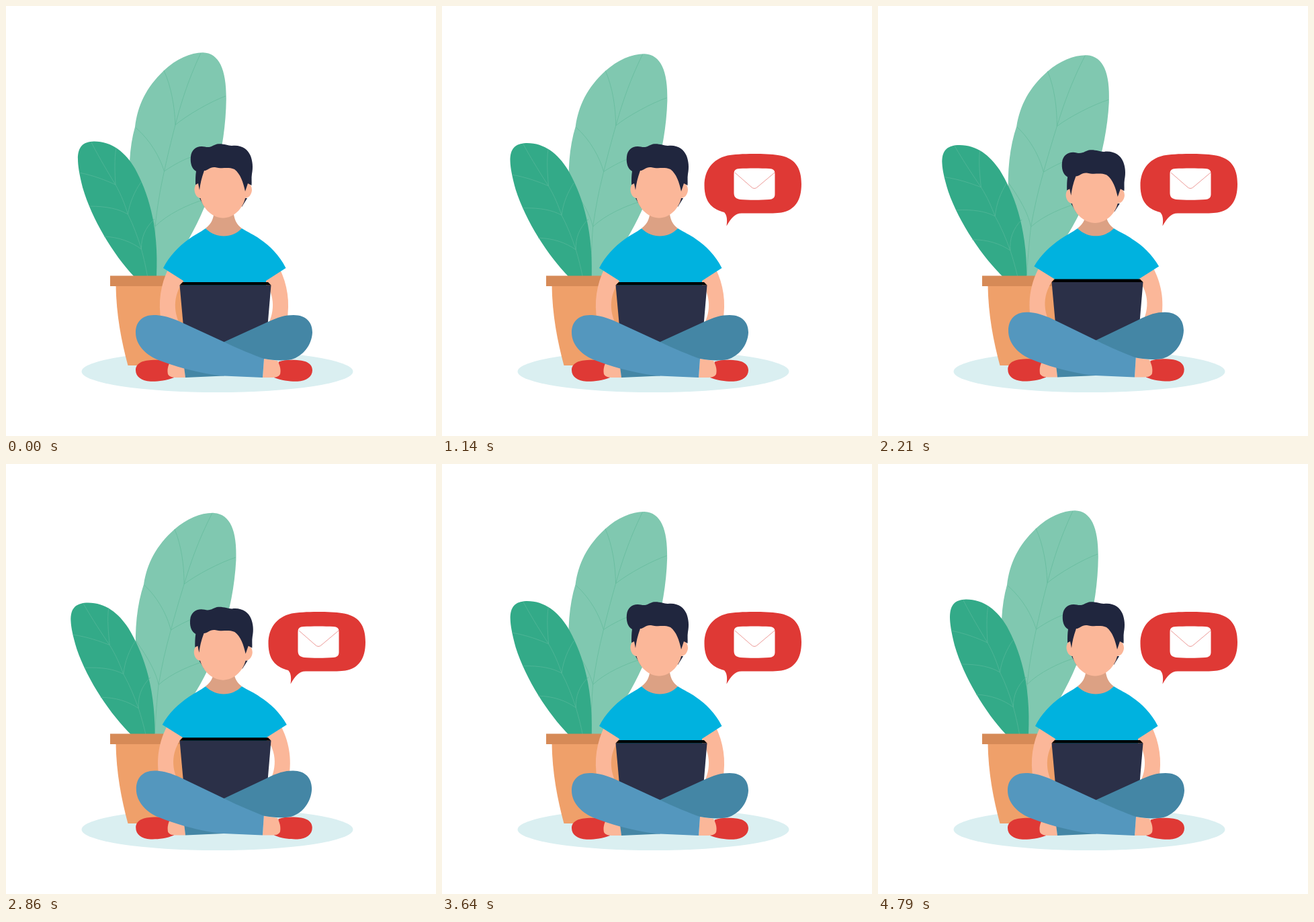
Recreate the animation shown at these times as an HTML page with a canvas. Size 640 by 640 pixels, loop 4.87 s.

```html
<!DOCTYPE html>
<html lang="en">
<head>
<meta charset="utf-8">
<title>Working with a laptop</title>
<style>
  html, body { margin: 0; height: 100%; overflow: hidden; background: #fff; }
  canvas { display: block; }
</style>
</head>
<body>
<canvas id="stage" width="640" height="640"></canvas>
<script>
const ctx = document.getElementById('stage').getContext('2d');
const LOOP = 4870;
const clamp = v => Math.max(0, Math.min(1, v));

const skin = '#fbb799', red = '#df3935', ink = '#20263e';

const lightLeaf = 'M222,402 C184,330 175,240 192,180 C196,148 208,122 235,96 C253,79 275,69.3 293,69.3 C317,70 328,94 327.8,138 C327,215 305,290 272,347 C262,365 248,385 238,402 Z';
const lightVeins = `M290,70 C270,112 259,150 252,177 C246,200 240,225 235.5,246 C229,275 225,300 222,328 C221,350 221,375 221,402
  M235,96 C246,120 251,150 252,177 M327,134 C305,142 270,162 252,177
  M193,181 C215,200 229,225 235.5,246 C250,236 265,228 278,224
  M185,265 C205,290 217,310 222,328 C240,310 270,296 292,289`;

const darkLeaf = 'M190,402 C160,370 128,318 114,270 C109,250 107,237 107,228 C107,209 115,202 131,201.5 C158,201.5 178,218 192,242 C210,275 228,325 224,402 L224,412 L200,412 Z';
const darkVeins = `M127,203 C140,228 152,248 163,266 C172,282 177,296 181.5,310 C190,327 196,344 201.5,362 C205,375 208,388 210.5,402
  M164,211 C161,228 162,248 163,266 M109,248 C130,252 150,260 163,266
  M201,262 C192,275 184,292 181.5,310 M124,298 C150,298 168,302 181.5,310
  M221,317 C207,330 201,345 201.5,362 M146,343 C168,344 187,351 201.5,362`;

const neck = 'M310,300 C310,320 303,326 297,331 L310,346 L340,346 L351,331 C345,326 339,321 338,300 Z';
const shirt = 'M297,331 C305,339 315,342.5 324,342.5 C334,342.5 343,339 351,331 C360,337 369,340 378,347 C393,357 407,371 416.5,390 L387,409 L387,430 L264,430 L264,409 L234,390 C243,372 257,358 272,347 C280,341 289,337 297,331 Z';
const arm = 'M242,390 C230,415 226,440 231,470 L262,480 C249,458 247,432 265,408 Z';

const nape = 'M288,286 L296,300 L296,286 Z M359,286 L351,299 L351,286 Z';
const ears = 'M290,264 C284,262 280.5,267 280.5,274 C281,281 285,286 290,286 Z M356,264 C362,262 366,267 366,274 C365.5,281 361,286 356,286 Z';
const face = 'M290,232 L356,232 L357.5,275 C357,300 339,315.5 323,315.5 C307,315.5 288.5,300 288,275 Z';
const hair = 'M283,246 C276,242 274,233 275,224 C276,213 285,207 296,209.5 C305,212 309,206 316,205.3 C325,205 330,208 336,208 C350,206 360,213 364,223 C367,231 368,240 366,250 C365,256 366,262 365.5,267 L360,264 L356,276 C353,262 349,250 340,243 C330,239 322,243 311,240 C304,239 300,245 295,245 C291,256 289,265 288,274 L286,264 L282,266 C282,258 282,252 283,246 Z';

const laptop = 'M258.5,415.5 L394.5,415.5 L386.5,510 L267,510 Z';
const laptopEdge = 'M263,411 L390,411 L394.5,415.5 L258.5,415.5 Z';

const shoe = 'M250,553 C238,558 225,559 215,558.7 C202,558 193,552 193,542 C193,532 203,527.5 216,527 C226,526.5 235,526.5 243,529.5 Z';
const ankle = 'M245,528 C240,537 240,543 241,548 C243,552 248,553 254,553 L267,553 L265,525 Z';
const backLeg = 'M324.5,500 L388,471 C405,463 415,460 428,460 C447,460 456,471 456,486 C455,505 442,521 425,526 C412,528.5 398,527.5 384,525 L324,550.5 L267,553 L265,537 Z';
const frontLeg = 'M324.5,500 L255,468 C240,462 230,460 220,460 C202,460 193,471 193,486 C193,505 209,520 227,527 C240,532 252,536 265,539.5 C290,546 308,549.5 324,550.5 L382,553 L384,525 C370,520 345,510 324.5,500 Z';

const bubble = 'M423.5,327.5 C425,318 424,311 420,307 C405,303 390.5,295 390.5,267 C390.5,245 402,228 425,222.5 C440,219.5 480,219 500,222 C525,225.5 535,240 535,265 C535,290 525,304 505,307.5 C495,309 470,308.5 446,308.5 C436,308.5 430,316 423.5,327.5 Z';
const envelope = 'M443,242 C455,241.3 475,241.3 487,242 C493,242.5 495.5,244 495.5,250 L495.5,280 C495.5,286 492,287.5 487,288 C475,289 455,289 444,288 C437,287 434.5,284 434.5,278 L434.5,250 C434.5,244 437,242.5 443,242 Z';
const flap = 'M436,248 L460,269 Q465,274 470,269 L495,248';

// Moves every point of a path by the offset that warp(x, y) returns.
function shape(d, warp) {
  if (!warp) return new Path2D(d);
  return new Path2D(d.replace(/([\d.]+),([\d.]+)/g, (_, x, y) => {
    const [dx, dy] = warp(+x, +y);
    return `${+x + dx},${+y + dy}`;
  }));
}

function fill(color, d, warp) {
  ctx.fillStyle = color;
  ctx.fill(shape(d, warp));
}

function line(color, d, warp) {
  ctx.strokeStyle = color;
  ctx.lineWidth = 0.8;
  ctx.stroke(shape(d, warp));
}

function fillBoth(color, d, warp) {
  fill(color, d, warp);
  ctx.save();
  ctx.translate(649, 0);
  ctx.scale(-1, 1);
  fill(color, d, warp);
  ctx.restore();
}

function drawPlant(sway) {
  const bendRight = (x, y) => {
    const h = 402 - y;
    return [sway * (0.083 * h - 8.2e-5 * h * h), sway * 0.048 * (x - 210)];
  };
  const leanLeft = (x, y) => [sway * 0.052 * (y - 452), sway * 0.052 * (238 - x)];

  fill('#80c8b0', lightLeaf, bendRight);
  line('#66bc9e', lightVeins, bendRight);
  fill('#33aa88', darkLeaf, leanLeft);
  line('#54b698', darkVeins, leanLeft);
  fill('#efa06a', 'M163.5,415 C164,460 172,500 181.5,535 H280 V415 Z');
  fill('#d68a57', 'M155,401.5 H280 V417 H155 Z');
}

function drawPerson(breath) {
  const head = (x, y) => [breath * 0.022 * (x - 321), breath * (9.2 - 0.014 * (y - 205))];
  const chest = (x, y) => {
    const k = breath * clamp((y - 340) / 50);
    return [k * 0.018 * (x - 325), -2.6 * k];
  };
  const elbow = (x, y) => [-3.6 * breath * clamp((y - 370) / 60), -3 * breath];
  const lift = () => [0, -4.6 * breath];
  const legs = (x, y) => {
    const k = breath * clamp((565 - y) / 110);
    return [k * 0.011 * (324.5 - x), -4.5 * k];
  };

  fill('#dca184', neck);
  fillBoth(skin, arm, elbow);
  fill('#00b2df', shirt, chest);

  fill(ink, nape, head);
  fill(skin, ears, head);
  fill(skin, face, head);
  fill(ink, hair, head);

  fill('#2b3048', laptop, lift);
  fill('#000', laptopEdge, lift);

  fillBoth(red, shoe, legs);
  fillBoth(skin, ankle, legs);
  fill('#4486a5', backLeg, legs);
  fill('#5497be', frontLeg, legs);
}

function drawMessage(scale) {
  if (scale <= 0) return;
  ctx.save();
  ctx.translate(423.5, 327.5);
  ctx.scale(scale, scale);
  ctx.translate(-423.5, -327.5);
  fill(red, bubble);
  fill('#fff', envelope);
  line('#e8807d', flap);
  ctx.restore();
}

function frame(now) {
  const t = now % LOOP;
  const sway = t < 4760 ? Math.sin(Math.PI * t / 4760) ** 2 : 0;
  const breath = Math.sin(Math.PI * clamp((t - 1170) / 2410));
  const pop = 1 - (1 - clamp((t - 395) / 815)) ** 3;

  ctx.fillStyle = '#fff';
  ctx.fillRect(0, 0, 640, 640);
  ctx.fillStyle = '#daeff1';
  ctx.beginPath();
  ctx.ellipse(314.5, 544, 202, 31, 0, 0, 2 * Math.PI);
  ctx.fill();

  drawPlant(sway);
  drawPerson(breath);
  drawMessage(pop);
  requestAnimationFrame(frame);
}
requestAnimationFrame(frame);
</script>
</body>
</html>
```
